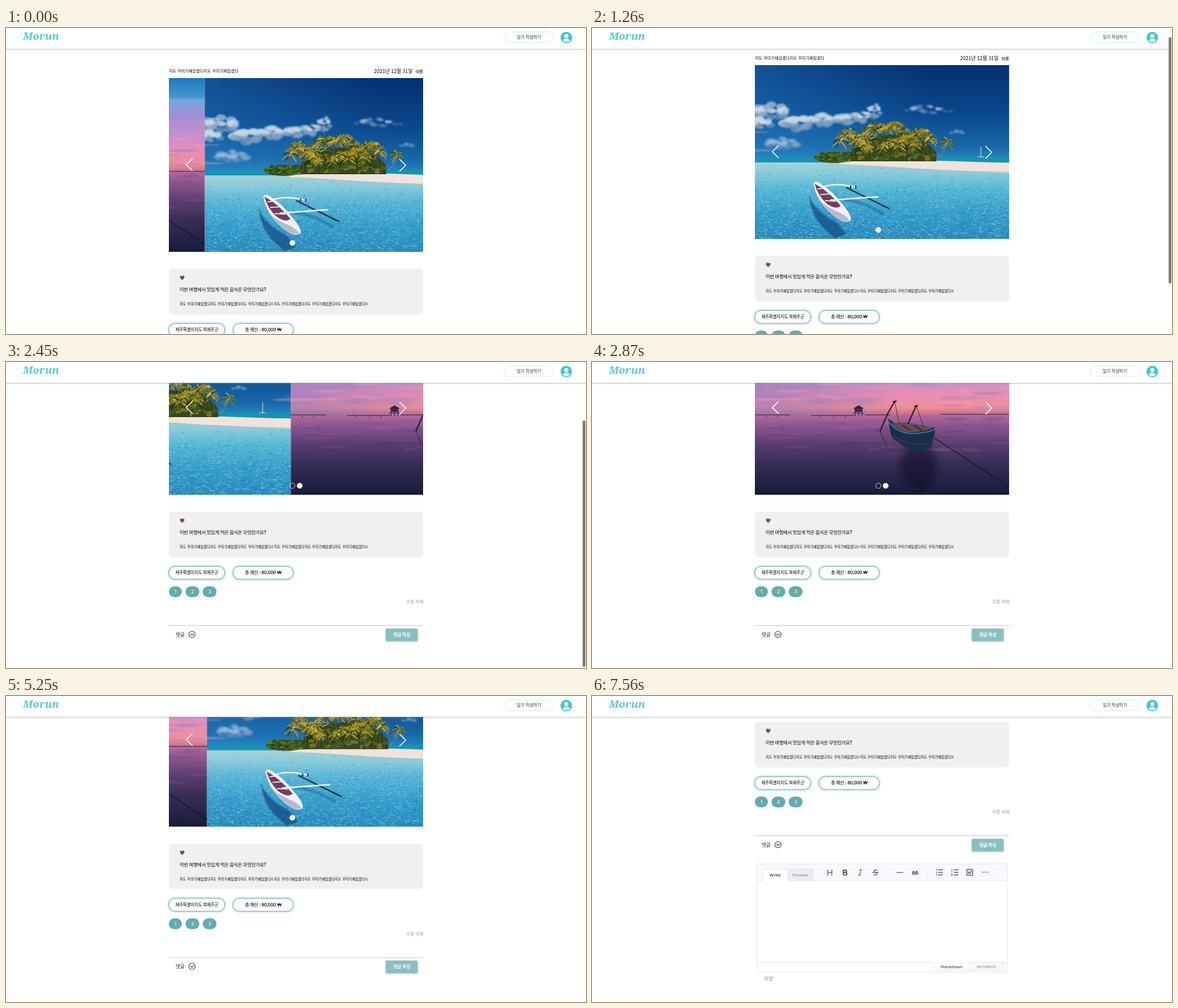
An HTML page that plays this animation: 1029x544 px, repeating every 7.63 s.

```html
<!DOCTYPE html>
<html lang="ko">
<head>
<meta charset="utf-8">
<title>Travel diary</title>
<style>
html, body { margin: 0; height: 100%; overflow: hidden; background: #fff; }
svg { display: block; }
#stage { width: 100vw; height: 100vh; }
text { font-family: Inter, 'Noto Sans CJK KR', 'Noto Sans CJK', sans-serif; letter-spacing: -.04em; }
.hand { font-family: 'Noto Sans CJK KR', 'Noto Sans CJK', sans-serif; font-weight: 300; letter-spacing: 0; }
.ed { font-family: 'Open Sans', sans-serif; font-weight: 600; letter-spacing: 0; }
.logo { font-family: 'Noto Serif', serif; font-weight: 700; font-style: italic; letter-spacing: 0; }
.line { fill: none; stroke-linecap: round; stroke-linejoin: round; }
</style>
</head>
<body>
<svg id="stage" viewBox="0 0 1029 544">
  <defs>
    <filter id="soft" x="-20%" y="-20%" width="140%" height="140%"><feGaussianBlur stdDeviation="1.2"/></filter>
    <filter id="haze" x="-40%" y="-40%" width="180%" height="180%"><feGaussianBlur stdDeviation="6"/></filter>
    <filter id="glow" x="-20%" y="-50%" width="140%" height="200%"><feGaussianBlur stdDeviation="1.5"/></filter>
  </defs>
  <g id="page"></g>
  <g id="head"></g>
  <rect id="thumb" x="1023" width="5" rx="2.5" fill="#7d7d7d"/>
</svg>
<script>
const LOOP = 7630, STEP = 70, W = 451, H = 309;
const $ = id => document.getElementById(id);

let seed = 11;
const rnd = (a = 0, b = 1) => {
  seed = (seed * 16807) % 2147483647;
  return a + (b - a) * seed / 2147483647;
};
const pick = list => list[Math.floor(rnd(0, list.length))];
const many = (n, f) => Array.from({ length: n }, (_, i) => f(i)).join('');
const f1 = v => v.toFixed(1);

const text = (x, y, size, str, more = '') => `<text x="${x}" y="${y}" font-size="${size}" ${more}>${str}</text>`;
const rect = (x, y, w, h, fill, more = '') => `<rect x="${x}" y="${y}" width="${w}" height="${h}" fill="${fill}" ${more}/>`;
const oval = (x, y, rx, ry, fill, more = '') =>
  `<ellipse cx="${f1(x)}" cy="${f1(y)}" rx="${f1(rx)}" ry="${f1(ry)}" fill="${fill}" ${more}/>`;
const shape = (d, fill, more = '') => `<path d="${d}" fill="${fill}" ${more}/>`;
const line = (d, color, w, more = '') => `<path class="line" d="${d}" stroke="${color}" stroke-width="${w}" ${more}/>`;
const grad = (id, stops, across) => `<linearGradient id="${id}" x2="${across ? 1 : 0}" y2="${across ? 0 : 1}">` +
  stops.map(([o, c, a = 1]) => `<stop offset="${o}" stop-color="${c}" stop-opacity="${a}"/>`).join('') + '</linearGradient>';
const MID = 'text-anchor="middle"', END = 'text-anchor="end"';

// Scenery

function cloud([x, y, w, h, a = .6]) {
  return many(26, () => {
    const k = rnd(-.5, .5), v = rnd(-.5, .5), r = rnd(.09, .17) * Math.min(w, 2 * h);
    return oval(x + k * w, y + v * h * (1 - 1.2 * Math.abs(k)), r * 1.3, r * .8,
      v < .1 ? '#ccd8e4' : '#7f9fc2', `opacity="${a}"`);
  });
}

function palm(x, y, r, colors) {
  return many(13, i => {
    const a = -Math.PI * (i / 12 * 1.5 - .25), len = r * rnd(.75, 1.1);
    const dx = Math.cos(a) * len, dy = Math.sin(a) * len * .9;
    return line(`M${f1(x)} ${f1(y)}q${f1(dx * .6)} ${f1(dy - 2)} ${f1(dx)} ${f1(dy + r * .3)}`, pick(colors), rnd(.9, 1.8));
  });
}

function ripples(n, color) {
  let d = '';
  for (let i = 0; i < n; i++) {
    const k = Math.sqrt(rnd());
    d += `M${f1(rnd(-3, W))} ${f1(176 + 133 * k)}l${f1(rnd(1, 2 + 3 * k))} ${f1(rnd(-1, 1) * k)}`;
  }
  return line(d, color, 1.2);
}

function island() {
  const clouds = [[28, 82, 50, 30], [8, 102, 40, 22], [74, 103, 50, 24], [48, 140, 54, 20, .35], [116, 99, 40, 26],
    [160, 95, 36, 22], [190, 92, 30, 24], [212, 82, 22, 34], [308, 79, 84, 14, .3], [360, 120, 28, 9, .15]];
  const gold = ['#d9b13a', '#b8942a', '#8a8424', '#56661f', '#2c421b'], dark = ['#8b8226', '#5a671f', '#3a521c', '#1f3417'];
  const canopy = x => 104 + Math.abs(x - 240) * .3 + 6 * Math.sin(x / 7);
  return `<defs>${grad('sky', [[0, '#052f70'], [.5, '#0a478c'], [.85, '#1668a8'], [1, '#2c8abf']])}
    ${grad('side', [[0, '#2a86cc', .38], [.7, '#2a86cc', 0]], true)}
    ${grad('sea', [[0, '#a3d2da'], [.14, '#8acbdb'], [.35, '#58b7d6'], [.65, '#389fcb'], [1, '#2a8cbf']])}</defs>` +
    rect(0, 0, W, 170, 'url(#sky)') + rect(0, 0, W, 170, 'url(#side)') +
    `<g filter="url(#soft)">${clouds.map(cloud).join('')}</g>` +
    rect(0, 163, W, 12, '#1593b6') + rect(0, 173, W, 136, 'url(#sea)') +
    ripples(1100, 'rgba(165,228,242,.45)') + ripples(1000, 'rgba(16,104,166,.42)') +
    shape('M150 173Q190 168 330 170L451 174V191Q330 187 260 182T150 176Z', '#f1e3dc') +
    line('M180 178Q280 186 451 190', '#c9b4b0', 1, 'opacity=".6"') +
    shape('M166 171L172 150Q196 128 220 128Q250 118 280 128Q308 134 322 156V171Z', '#33431b') +
    many(28, i => {
      const x = 152 + i * 6;
      return line(`M${f1(x)} 168q${f1(rnd(-5, 5))} -18 ${f1(rnd(-5, 5))} ${f1(rnd(-44, -30))}`, '#6b5833', 1);
    }) +
    many(20, () => palm(rnd(172, 314), rnd(128, 150), rnd(9, 14), dark)) +
    many(22, i => {
      const x = 152 + i * 7.6;
      return palm(x, canopy(x) + rnd(0, 8), rnd(10, 15), gold);
    }) +
    many(14, () => palm(rnd(165, 312), rnd(128, 148), rnd(8, 13), gold)) +
    many(50, () => oval(rnd(178, 320), rnd(156, 169), rnd(3, 6), rnd(2, 4), pick(['#2d461a', '#455c20', '#6d7228']))) +
    oval(140, 164, 35, 10, '#38551b') +
    many(70, () => oval(140 + rnd(-31, 31), 163 + rnd(-8, 8), rnd(1, 3.5), 1.5, pick(['#66841f', '#4c6d1f', '#26401a']))) +
    line('M326 163Q336 156 341 141', '#9a9a72', 1) + palm(341, 138, 13, gold) +
    line('M401 145V162M396 163h10', '#e8f0f4', 1) +
    `<g filter="url(#soft)">${shape('M96 232Q108 262 146 280L162 300L142 308L122 290Q100 268 96 232Z', '#14558c', 'opacity=".85"')}
    ${line('M160 240Q186 240 226 264', '#14558c', 5, 'opacity=".45"')}</g>` +
    shape('M104 210Q108 205 114 209Q136 222 154 246Q172 266 170 275Q164 282 152 276Q128 262 115 240Q106 226 104 210Z', '#f1eff3') +
    shape('M106 211Q128 222 152 250Q144 258 127 246Q112 232 106 211Z', '#733c60') +
    shape('M150 262Q160 266 168 276Q160 280 150 274Q130 262 118 244Q134 256 150 262Z', '#b9b9cc') +
    line('M112 220L121 219M117 230L132 229M125 241L143 242', '#e9dde6', 2) +
    line('M163 218L238 255', '#27334f', 2.6) + line('M163 217L200 235', '#596784', 1) +
    line('M120 217Q142 208 178 217', '#f3f5f7', 2.4) + line('M134 240Q160 238 218 234', '#f3f5f7', 2.4) +
    line('M170 215v4M179 215v4', '#1b2946', 2);
}

function sunset() {
  return `<defs>${grad('dusk', [[0, '#1c78bd'], [.11, '#4598cf'], [.13, '#79a5dc'], [.21, '#a18ed6'], [.35, '#cd8fca'],
      [.43, '#ea8fae'], [.5, '#ee8c98'], [.535, '#c8708c'], [.545, '#b0699c'], [.6, '#8d5690'], [.7, '#5d3f73'],
      [.82, '#372d56'], [1, '#181b3a']])}
    ${grad('cool', [[0, '#7d74c4', .5], [.6, '#7d74c4', 0]], true)}</defs>` +
    rect(0, 0, W, H, 'url(#dusk)') + rect(0, 40, W, 128, 'url(#cool)') +
    `<g filter="url(#soft)">${many(34, () => oval(rnd(0, W), rnd(100, 160), rnd(14, 46), rnd(1, 2.6),
      rnd() < .5 ? '#f3a3b8' : '#9580c4', 'opacity=".4"'))}
    ${many(44, () => oval(rnd(0, W), rnd(172, 245), rnd(10, 34), rnd(.6, 1.6),
      rnd() < .5 ? '#c183b4' : '#3a2c5c', 'opacity=".22"'))}</g>` +
    oval(290, 258, 32, 44, '#0d1027', 'opacity=".55" filter="url(#haze)"') +
    line('M0 167H62M100 168H176M196 167H240M330 166H451', '#4a3a60', 1.4) +
    line('M20 168v4M40 168v3M115 167v5M140 167v4M160 167v5', '#3b2d50', 1) +
    shape('M174 156l10 -6l10 6z', '#2e2540') + rect(177, 156, 14, 6, '#3a2d4a') +
    line('M178 161V169M184 161V169M190 161V169M174 164H194', '#2e2540', 1.2) +
    shape('M237 173Q246 183 271 190Q300 191 318 189L320 196L313 223Q302 232 288 231Q264 226 244 208Q238 196 237 173Z', '#173049') +
    shape('M242 182Q262 178 290 184L316 190Q300 198 271 198Q250 192 242 182Z', '#664a50') +
    line('M238 180Q250 196 273 200Q300 201 319 193', '#357594', 2.4) +
    line('M245 204Q268 222 312 218', '#5b3340', 1.2) + line('M262 186L276 194M284 186L296 195', '#2a2233', 2) +
    line('M248 143L236 164L222 196M286 151L272 182', '#221b2c', 2.2) +
    line('M222 196L235 226M286 151L300 190M248 143L256 184', '#221b2c', .8) +
    line('M246 144l4 -1M284 152l4 -1', '#221b2c', 3) +
    line('M318 208L451 295', '#14131f', 1.4);
}

// Page

function pill(x, w, str, size) {
  const box = `x="${x}" y="525.5" width="${w}" height="22.5" rx="11.2"`;
  return `<rect ${box} fill="none" stroke="#7fc0c1" stroke-width="2.6" filter="url(#glow)"/>
    <rect ${box} fill="#fff" stroke="#7fb5b7" stroke-width="1"/>` +
    text(x + w / 2, 539, size, str, MID + ' font-weight="500"');
}

function editor() {
  const ink = '#555', edge = 'stroke="#dfe4e9"';
  return rect(292.5, 680.5, 444, 192.5, '#fff', `rx="2" ${edge}`) +
    rect(293, 681, 443, 29, '#f7f9fc') + line('M293 710.5H736M293 855.5H736', '#e3e8ec', 1) +
    rect(303, 689.5, 44.5, 21.5, '#fff') + line('M303 711V689.5H347.5', '#e3e8ec', 1) +
    rect(347.5, 689.5, 44.5, 21, '#ebedef', edge) +
    text(325, 703, 7.6, 'Write', `class="ed" ${MID} fill="#333"`) +
    text(369.5, 703, 7.6, 'Preview', `class="ed" ${MID} fill="#969aa0"`) +
    line('M418.5 691V700.5M425.5 691V700.5M418.5 695.7H425.5', ink, 1.3) +
    line('M446 691.5H449.5a2 2 0 0 1 0 4.2H446ZM446 695.7H450a2.2 2.2 0 0 1 0 4.4H446Z', ink, 1.9) +
    line('M474.5 691H479M472.5 700.5H477M476.8 691L474.8 700.5', ink, 1.2) +
    line('M506 692.5Q503 690 500.5 692Q499.5 695 503 695.7Q507 697 505.5 699.5Q503 701.5 499.5 699.2M497.5 695.7H508', ink, 1.2) +
    line('M524.5 690V701M594.5 690V701', '#dfe4e9', 1) + line('M540.5 695.7H551.5', ink, 1.3) +
    text(573, 699.6, 9, '66', `${MID} font-weight="800" fill="${ink}"`) +
    line('M614.5 691H621.5M614.5 695.5H621.5M614.5 700H621.5M642.5 691H649.5M642.5 695.5H649.5M642.5 700H649.5', ink, 1.3) +
    line('M611 691h.2M611 695.5h.2M611 700h.2', ink, 1.9) +
    text(637, 695, 6, '1', `font-weight="700" fill="${ink}"`) + text(636.6, 702, 6, '2', `font-weight="700" fill="${ink}"`) +
    rect(664.8, 690.2, 10.6, 10.6, '#d9dcde', `rx="1" stroke="${ink}" stroke-width="1.2"`) +
    line('M667.5 695.5L669.5 697.5L673 693.5', ink, 1.2) +
    line('M693.7 695.2h.1M698 695.2h.1M702.3 695.2h.1', ink, 2) +
    rect(668.5, 855.5, 62, 14.5, '#f7f9fc', edge) + rect(606.5, 855, 62, 15, '#fff') +
    line('M606.5 856V870H668.5', '#e3e8ec', 1) +
    text(638, 866, 7.6, 'Markdown', `class="ed" ${MID} fill="#555"`) +
    text(699.5, 866, 7.6, 'WYSIWYG', `class="ed" ${MID} fill="#969aa0"`) +
    text(305, 888, 9, '저장', 'fill="#8a8a8a"');
}

const note = '지도 꾸미기재밌겠다', notes = note.repeat(3) + 'ㅌ';

$('page').innerHTML =
  text(289, 79.2, 7.2, note.repeat(2), 'class="hand"') +
  text(653, 80, 8.8, '2021년 12월 31일', 'class="hand"') +
  text(740, 79.5, 7.4, '태풍', `class="hand" ${END}`) +
  `<svg x="289" y="89" width="${W}" height="${H}"><g id="picA">${island()}</g><g id="picB">${sunset()}</g></svg>` +
  line('M330.5 232.5L319.8 243L330.5 253.5M698.5 233.5L709.2 244L698.5 254.5', '#fff', 1.7) +
  [508, 521].map((x, i) => `<circle id="dot${i}" cx="${x}" cy="382" r="4.6" stroke="#fff" stroke-width=".9"/>`).join('') +
  rect(289, 428, W, 81, '#f0f0f0', 'rx="7"') +
  shape('M312.6 448.2L309 444.4C307.4 441.6 310.8 438.6 312.6 441.4C314.4 438.6 317.8 441.6 316.2 444.4Z', '#7d4b5c') +
  text(308, 468, 8.37, '이번 여행에서 맛있게 먹은 음식은 무엇인가요?', 'font-weight="500"') +
  text(308, 493.3, 6.3, notes + notes, 'class="hand"') +
  pill(289, 99, '제주특별자치도 북제주군', 7.66) + pill(403, 106.5, '총 예산 : 80,000 ₩', 8.1) +
  [[289, 23], [318.5, 24.5], [349, 24.5]].map(([x, w], i) => rect(x, 560.7, w, 19.4, '#62acaf', 'rx="9.7"') +
    text(x + w / 2, 573.4, 8, i + 1, `${MID} fill="#fff" font-weight="500"`)).join('') +
  text(710, 591, 7.8, '수정', 'fill="#999"') + text(740, 591, 7.8, '삭제', `fill="#999" ${END}`) +
  line('M289 630.5H740', '#b9cccc', 1) +
  text(301, 649.6, 8.8, '댓글', 'fill="#222"') +
  `<circle cx="330" cy="646.3" r="5.5" fill="none" stroke="#333" stroke-width="1.1"/>` +
  line('M327.3 645.2L330 647.9L332.7 645.2', '#333', 1.1) +
  rect(673.5, 636.5, 57, 22.5, '#8aa5a6', 'rx="2" filter="url(#glow)" opacity=".8"') +
  rect(674, 636, 56, 22, '#88bfc2', 'rx="2"') +
  text(702, 649.6, 8, '댓글 작성', `${MID} fill="#fff" font-weight="600"`) +
  `<g id="editor">${editor()}</g>`;

$('head').innerHTML =
  rect(-5, 0, 1039, 38, '#999', 'filter="url(#glow)" opacity=".7"') + rect(0, 0, 1029, 37, '#fff') +
  text(30, 21, 18.5, 'Morun', 'class="logo" fill="#58cbd0"') +
  rect(883.5, 7, 88, 19, '#fff', 'rx="9.5" stroke="#c9eff0"') +
  text(927.5, 19, 7.8, '일기 작성하기', `${MID} fill="#333"`) +
  `<circle cx="994" cy="17" r="10.2" fill="#43c5cd"/><circle cx="994" cy="14.3" r="3.7" fill="#eafafa"/>` +
  shape('M987.4 22.6Q989.5 19 994 19T1000.6 22.6Q998 25.3 994 25.3T987.4 22.6Z', '#eafafa');

// Motion

const scrollKeys = [[0, 0], [910, 0], [980, 1.5], [1120, 10], [1260, 23], [1400, 30], [1540, 30], [1680, 40], [1820, 66],
  [1890, 110], [1960, 146], [2030, 162], [3290, 162], [3640, 165.5], [5670, 165.5], [5740, 168], [5810, 170],
  [6300, 170], [6370, 180], [6510, 255], [6650, 335], [6860, 382], [LOOP, 382]];
const slides = [[-316, 0], [2280, 1], [4940, 0]], SLIDE = 560;
const bars = [[980, 2520], [3360, 4130], [5740, 7350]];
const EDITOR = 5740;

const clamp = v => Math.max(0, Math.min(1, v));

function scrollAt(t) {
  const i = scrollKeys.findIndex(k => k[0] > t);
  const [t0, a] = scrollKeys[i - 1], [t1, b] = scrollKeys[i];
  return a + (b - a) * (t - t0) / (t1 - t0);
}

// CSS "ease" curve
function ease(p) {
  let lo = 0, hi = 1, u = p;
  for (let i = 0; i < 24; i++) {
    u = (lo + hi) / 2;
    const x = .75 * u * (1 - u) + u ** 3;
    if (x < p) lo = u; else hi = u;
  }
  return p >= 1 ? 1 : .3 * u * (1 - u) ** 2 + 3 * u * u * (1 - u) + u ** 3;
}

function draw(t) {
  const s = scrollAt(t), open = t >= EDITOR;
  $('page').setAttribute('transform', `translate(0 ${-s})`);
  $('editor').style.display = open ? '' : 'none';

  const [start, now] = slides.filter(k => k[0] <= t).pop();
  const e = ease(clamp((t - start) / SLIDE));
  ['picA', 'picB'].forEach((id, i) =>
    $(id).setAttribute('transform', `translate(${i === now ? W * (1 - e) : -W * e} 0)`));
  [0, 1].forEach(i => {
    $('dot' + i).setAttribute('fill', i === now ? '#fff' : 'none');
    $('dot' + i).setAttribute('stroke-opacity', i === now ? 1 : now ? .85 : .25);
  });

  const bar = bars.find(([from, fade]) => t >= from && t < fade + 210);
  const len = open ? 338 : 438;
  const top = open ? s * .582 : Math.max(0, s - 1.5) * .76;
  $('thumb').setAttribute('height', len);
  $('thumb').setAttribute('y', Math.min(top, 542 - len));
  $('thumb').setAttribute('opacity', bar ? clamp((bar[1] + 210 - t) / 280) : 0);
}

let last = -1;
function tick() {
  const t = Math.floor(performance.now() % LOOP / STEP) * STEP;
  if (t !== last) draw(last = t);
  requestAnimationFrame(tick);
}
tick();
</script>
</body>
</html>
```
